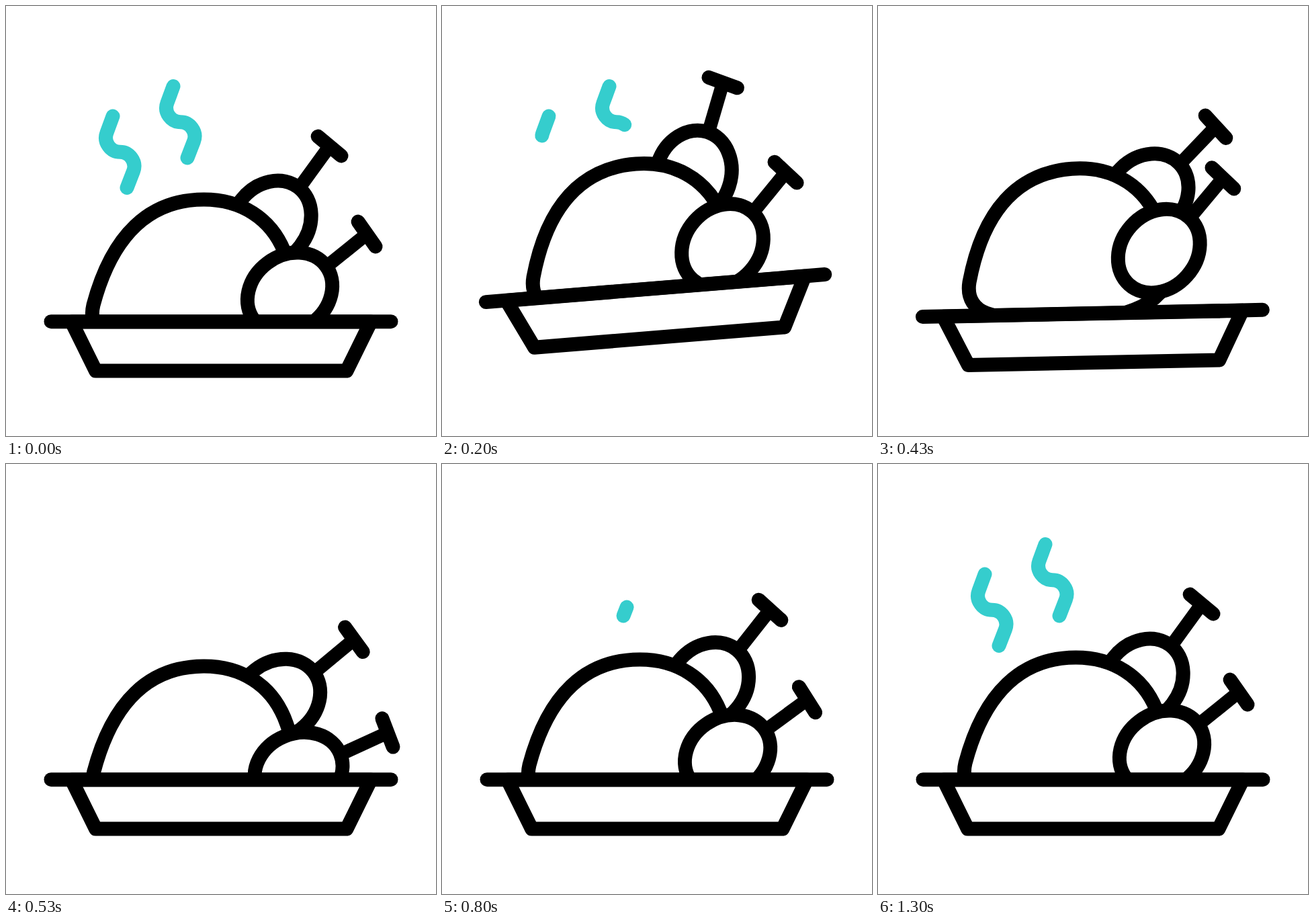
Animation, 640 px wide and 640 px high, one loop 1.67 s. Source, as an HTML page:

```html
<!DOCTYPE html>
<html lang="en">
<head>
<meta charset="utf-8">
<title>Roast on a platter</title>
<style>
  html, body { margin: 0; width: 100%; height: 100%; overflow: hidden; background: #fff; }
  svg { display: block; width: 100vw; height: 100vh; }
  .ink { fill: #fff; stroke: #000; stroke-width: 21; stroke-linecap: round; stroke-linejoin: round; }
  .bone { stroke-width: 20; stroke-linecap: butt; }
  .steam { fill: none; stroke: #35cdcd; stroke-width: 21; stroke-linecap: round; }
</style>
</head>
<body>
<svg viewBox="0 0 640 640">
  <defs>
    <g id="leg" class="ink">
      <path class="bone" d="M58 -42L114.5 -87.5"/>
      <path d="M101.5 -106L127.5 -69"/>
      <ellipse rx="67" ry="55.7" transform="rotate(-37)"/>
    </g>
    <path id="wisp" pathLength="1" d="M159 164L150 188.5C144.5 203 156 217.3 169.7 217.3C183.5 217.3 195 231.5 189.5 246L180 270.5"/>
  </defs>
  <g id="bird">
    <g id="back"><use href="#leg" transform="translate(394 323) rotate(-15.2)"/></g>
    <path class="ink" d="M130 445C158 340 214 288 294.5 288C350 288 394 316 414 365C421 383 430 410 431 435C432 465 412 488 383 500C325 523 215 520 152 493C136 486 124 470 130 445Z"/>
    <g id="front"><use href="#leg" transform="translate(422.5 427)"/></g>
  </g>
  <g id="plate" class="ink">
    <path d="M97.5 470L133.5 543H507L543 470Z"/>
    <path d="M67 469.7H573"/>
  </g>
  <use id="steam1" class="steam" href="#wisp"/>
  <use id="steam2" class="steam" href="#wisp" x="90" y="-44.5"/>
</svg>
<script>
const LOOP = 1670, FPS = 30;
const SETTLE = 18, REST = 26;
const el = id => document.getElementById(id);

// Each part swings up to a peak, drops to a dip, then settles; times are in ticks.
// Legs swing about the hip inside the bird. Lift is upward, turn is counter-clockwise.
const parts = {
  plate: { pivot: '320 500', start: 1, peak: 8, dip: 15, lift: [62, 0], turn: [5.8, 0] },
  bird: { pivot: '294.5 370', start: 0.7, peak: 10, dip: 17, lift: [88, -18.8], turn: [7, 0] },
  back: { pivot: '340 373', start: 2.5, peak: 8, dip: 14, lift: [0, 0], turn: [22, -14.7] },
  front: { pivot: '358.5 485', start: 2.5, peak: 10.5, dip: 17, lift: [0, 0], turn: [18.8, -16.8] }
};

const ease = (t, a, b) => {
  const u = Math.min(1, Math.max(0, (t - a) / (b - a)));
  return u * u * (3 - 2 * u);
};

function place(id, t) {
  const { pivot, start, peak, dip, lift, turn } = parts[id];
  const up = ease(t, start, peak), down = ease(t, peak, dip), back = ease(t, SETTLE, REST);
  const swing = ([high, low]) => high * (up - down) + low * (down - back);
  el(id).setAttribute('transform', `translate(0 ${-swing(lift)}) rotate(${-swing(turn)} ${pivot})`);
}

// Wipes off from the foot up, then grows back from the foot
function drawSteam(id, t, wipe, grow) {
  const growing = t >= grow;
  const len = growing ? ease(t, grow, grow + 15) : 1 - ease(t, wipe, wipe + 8.7);
  const s = el(id).style;
  s.display = len > 0.004 ? '' : 'none';
  s.strokeDasharray = len < 1 ? `${len} 2` : 'none';
  s.strokeDashoffset = growing ? len - 1 : 0;
}

const begin = performance.now();
function render() {
  const ms = (performance.now() - begin) % LOOP;
  const t = Math.floor((ms + 4) * FPS / 1000);
  Object.keys(parts).forEach(id => place(id, t));
  drawSteam('steam1', t, 0, 24);
  drawSteam('steam2', t, 2.2, 21);
  requestAnimationFrame(render);
}
render();
</script>
</body>
</html>
```
